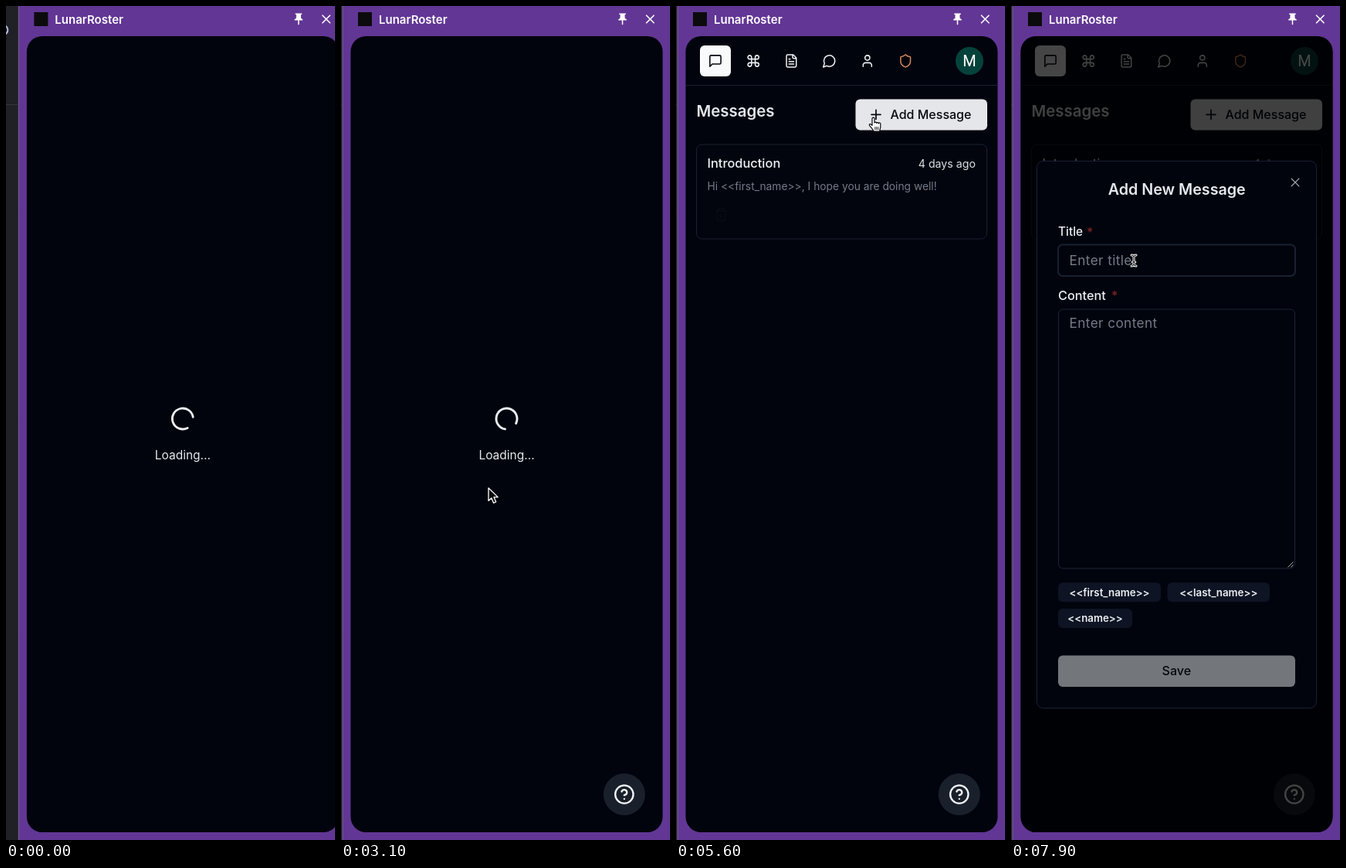
An HTML page with a canvas that plays this animation: 426x1078 px, repeating every 8000 ms.

```html
<!DOCTYPE html>
<html lang="en">
<head>
<meta charset="utf-8">
<title>Side panel</title>
<style>
html, body { margin: 0; width: 100%; height: 100%; overflow: hidden; background: #623695; }
canvas { display: block; width: 426px; height: 1078px; }
</style>
</head>
<body>
<canvas id="stage"></canvas>
<script>
const W = 426, H = 1078, LOOP = 8000;
const canvas = document.getElementById('stage');
const ctx = canvas.getContext('2d');
const dpr = window.devicePixelRatio || 1;
canvas.width = W * dpr;
canvas.height = H * dpr;

const SANS = 'Inter, "Open Sans", sans-serif';
const BG = '#01040d', WHITE = '#f8fafc', LINE = '#1a2130', MUTED = '#747b88';

const HELP_AT = 1500, PAGE_AT = 4050, DIALOG_AT = 6110;

const icons = {
  square: 'M21 15a2 2 0 0 1-2 2H7l-4 4V5a2 2 0 0 1 2-2h14a2 2 0 0 1 2 2z',
  command: 'M15 6v12a3 3 0 1 0 3-3H6a3 3 0 1 0 3 3V6a3 3 0 1 0-3 3h12a3 3 0 1 0-3-3',
  file: 'M15 2H6a2 2 0 0 0-2 2v16a2 2 0 0 0 2 2h12a2 2 0 0 0 2-2V7ZM14 2v4a2 2 0 0 0 2 2h4M10 9H8M16 13H8M16 17H8',
  bubble: 'M7.9 20A9 9 0 1 0 4 16.1L2 22Z',
  user: 'M19 21v-2a4 4 0 0 0-4-4H9a4 4 0 0 0-4 4v2M16 7a4 4 0 1 1-8 0a4 4 0 1 1 8 0',
  shield: 'M20 13c0 5-3.5 7.5-7.66 8.95a1 1 0 0 1-.67-.01C7.5 20.5 4 18 4 13V6a1 1 0 0 1 1-1c2 0 4.5-1.2 6.24-2.72a1.17 1.17 0 0 1 1.52 0C14.51 3.81 17 5 19 5a1 1 0 0 1 1 1z',
  trash: 'M3 6h18M19 6v14c0 1-1 2-2 2H7c-1 0-2-1-2-2V6M8 6V4c0-1 1-2 2-2h4c1 0 2 1 2 2v2M10 11v6M14 11v6',
  help: 'M22 12a10 10 0 1 1-20 0a10 10 0 1 1 20 0M9.09 9a3 3 0 0 1 5.83 1c0 2-3 3-3 3M12 17h.01',
  loader: 'M21 12a9 9 0 1 1-6.219-8.56',
  plus: 'M5 12h14M12 5v14',
  cross: 'M18 6L6 18M6 6l12 12',
  pin: 'M16 9V4h1c.55 0 1-.45 1-1s-.45-1-1-1H7c-.55 0-1 .45-1 1s.45 1 1 1h1v5c0 1.66-1.34 3-3 3v2h5.97v7l1 1 1-1v-7H19v-2c-1.66 0-3-1.34-3-3z'
};
for (const k in icons) icons[k] = new Path2D(icons[k]);

const arrow = new Path2D('M0 0V16.6L3.9 13L6.6 19.4L9.7 18L7 11.9H12.2Z');
const hand = new Path2D('M4 1.6a1.5 1.5 0 0 1 3 0V7a1.4 1.4 0 0 1 2.7.3a1.4 1.4 0 0 1 2.6.5a1.3 1.3 0 0 1 2.5.7V12c0 2-1 3-1 6H6C5 15.5 2.5 12.8.6 10.7C-.2 9 1.2 8 2.5 9L4 10.3z');
const handLines = new Path2D('M7.8 12.5v3.4M9.8 12.5v3.4M11.8 12.5v3.4');
const beam = new Path2D('M-3 -7Q0 -7 0 -5Q0 -7 3 -7M0 -5V5M-3 7Q0 7 0 5Q0 7 3 7M-1.8 2H1.8');

const clamp = v => Math.max(0, Math.min(1, v));
const ramp = (t, a, b) => clamp((t - a) / (b - a));
const smooth = p => p * p * (3 - 2 * p);

function box(x, y, w, h, r, fill, stroke, lw = 1) {
  ctx.beginPath();
  ctx.roundRect(x, y, w, h, r);
  if (fill) { ctx.fillStyle = fill; ctx.fill(); }
  if (stroke) { ctx.strokeStyle = stroke; ctx.lineWidth = lw; ctx.stroke(); }
}

function disc(x, y, r, fill) {
  ctx.beginPath();
  ctx.arc(x, y, r, 0, Math.PI * 2);
  ctx.fillStyle = fill;
  ctx.fill();
}

function text(s, x, y, size, weight, color, align = 'left', spacing = 0, family = SANS) {
  ctx.font = `${weight} ${size}px ${family}`;
  ctx.letterSpacing = spacing + 'px';
  ctx.textAlign = align;
  ctx.fillStyle = color;
  ctx.fillText(s, x, y);
}

// Draws a 24-unit icon centred on (x, y).
function icon(name, x, y, size, color, lw = 2, angle = 0) {
  ctx.save();
  ctx.translate(x, y);
  ctx.rotate(angle);
  ctx.scale(size / 24, size / 24);
  ctx.translate(-12, -12);
  ctx.lineCap = ctx.lineJoin = 'round';
  ctx.lineWidth = lw;
  ctx.strokeStyle = ctx.fillStyle = color;
  if (name === 'pin') ctx.fill(icons.pin); else ctx.stroke(icons[name]);
  ctx.restore();
}

function drawFrame() {
  // Edge of the browser window to the left of the panel
  ctx.fillStyle = '#623695';
  ctx.fillRect(-30, 0, W + 60, H);
  box(-60, -12, 62, H + 30, 12, '#202126', '#77678f', 1);
  ctx.fillStyle = '#35363c';
  ctx.fillRect(-30, 127, 31, 1);
  ctx.beginPath();
  ctx.arc(-18, 31, 6, 0, Math.PI * 2);
  ctx.strokeStyle = '#b4bbe0';
  ctx.lineWidth = 2;
  ctx.stroke();

  ctx.fillStyle = '#0b0b0d';
  ctx.fillRect(22, 8, 18, 18);
  text('LunarRoster', 49, 22.5, 15, 600, '#fff');
  icon('pin', 364.5, 17, 18, '#fff');
  icon('cross', 400.3, 17, 19, '#fff', 2.1);
  box(12.5, 39, 404, 1029, 20, BG);
}

function drawLoading(t) {
  icon('loader', 214.5, 533.5, 36, '#eceff4', 1.9, (62 + t * 0.36) * Math.PI / 180);
  text('Loading...', 214.5, 586, 15.5, 400, '#e6e9ee', 'center');
}

function drawHelp() {
  disc(366.8, 1019, 27, '#1a202b');
  icon('help', 366.8, 1019, 28, '#f1f4f8', 2);
}

function drawPage(t) {
  box(31, 51, 40, 40, 6, WHITE);
  icon('square', 51, 71, 19, '#05080f', 2);
  ['command', 'file', 'bubble', 'user'].forEach((name, i) =>
    icon(name, 100.2 + i * 49.2, 71, 19, '#eef1f5', 1.9));
  icon('shield', 297.2, 71, 19, '#d98a5c', 1.9);
  disc(380, 71, 18, '#05423b');
  text('M', 380, 78, 20, 400, '#fff', 'center', 0, 'Roboto, sans-serif');
  ctx.fillStyle = LINE;
  ctx.fillRect(12.5, 102, 404, 1);

  text('Messages', 26.5, 142.5, 20.4, 600, '#e3e6eb');
  const press = ramp(t, 5430, 5580);
  box(232.5, 120.5, 170.5, 40, 6, WHITE);
  box(232.5, 120.5, 170.5, 40, 6, `rgba(1,4,13,${0.08 * press})`);
  icon('plus', 259, 140.3, 20.5, '#05080f', 2);
  text('Add Message', 277.5, 145.5, 16, 500, '#05080f');

  const hover = ramp(t, 4850, 5130) * (1 - ramp(t, 5330, 5640));
  box(26.5, 179, 376, 122, 7, BG, LINE);
  box(27, 179.5, 375, 121, 7, `rgba(30,41,59,${0.32 * hover})`);
  text('Introduction', 40.5, 209.3, 16.4, 500, '#eef1f5');
  text('4 days ago', 388, 209, 14.2, 400, '#dde1e7', 'right');
  text('Hi <<first_name>>, I hope you are doing well!', 40.5, 238, 13.8, 400, MUTED);
  ctx.globalAlpha = hover;
  icon('trash', 58.8, 269.3, 19, '#3b414b', 1.8);
  ctx.globalAlpha = 1;
}

function chip(s, x, y, w) {
  box(x, y, w, 25, 6, '#0e1423');
  text(s, x + w / 2, y + 17.3, 13.3, 600, '#eceff4', 'center');
}

function drawDialog(t) {
  const p = ramp(t, DIALOG_AT, DIALOG_AT + 180);
  const ease = 1 - (1 - p) ** 2;
  box(12.5, 39, 404, 1029, 20, `rgba(0,0,0,${0.72 * ease})`);

  const s = 0.95 + 0.05 * ease;
  ctx.save();
  ctx.globalAlpha = ease;
  ctx.translate(214.5, 554);
  ctx.scale(s, s);
  ctx.translate(-214.5, -554);

  box(33.5, 200.5, 362, 707, 8, BG, '#182136');
  icon('cross', 368, 228, 19.5, '#a4a8af', 1.7);
  text('Add New Message', 214.7, 244.3, 19.7, 600, '#e6e9ee', 'center');

  text('Title', 61, 296.8, 15.4, 500, '#eceff4');
  text('*', 98, 297.5, 16, 500, '#7d2325');
  box(61, 308.5, 307, 40.5, 6, null, '#192130', 2);
  text('Enter title', 75.5, 334.5, 17.2, 400, MUTED, 'left', 0.4);

  text('Content', 61, 379.6, 16.3, 500, '#eceff4');
  text('*', 130, 380.3, 16, 500, '#7d2325');
  box(61.5, 392, 306, 335, 6, null, '#1d2534');
  text('Enter content', 75.5, 416.2, 17.2, 400, MUTED, 'left', 0.4);
  ctx.beginPath();
  ctx.moveTo(358.5, 725.5); ctx.lineTo(365.5, 718.5);
  ctx.moveTo(362.5, 725.5); ctx.lineTo(365.5, 722.5);
  ctx.strokeStyle = '#a7a9ad';
  ctx.lineWidth = 1;
  ctx.stroke();

  chip('<<first_name>>', 61, 745.3, 133);
  chip('<<last_name>>', 202.5, 745.3, 132.5);
  chip('<<name>>', 61, 779, 96);

  box(61, 839.5, 307, 40.5, 6, '#73767b');
  text('Save', 214.3, 865, 16, 500, '#05080f', 'center');

  // Caret blinks with a 500 ms half period
  if (Math.floor((t - 6100) / 500) % 2 === 0) {
    ctx.fillStyle = '#e6e9ee';
    ctx.fillRect(75.5, 316.5, 1.2, 25);
  }
  ctx.restore();
}

// Pointer hotspot: time, x, y
const track = [
  [300, 60, 150], [700, 108, 235], [1300, 112, 250], [2200, 191, 623],
  [4320, 191, 623], [5080, 90, 260], [5220, 90, 260], [5560, 254, 139],
  [6420, 254, 139], [6980, 159, 329], [LOOP, 159, 329]
];

function pointer(t) {
  const i = track.findIndex(k => k[0] > t);
  const [t0, x0, y0] = track[i - 1], [t1, x1, y1] = track[i];
  const p = smooth(ramp(t, t0, t1));
  return [x0 + (x1 - x0) * p, y0 + (y1 - y0) * p];
}

const inside = (x, y, l, top, r, b) => x >= l && x <= r && y >= top && y <= b;

function pointerKind(t, x, y) {
  if (t >= DIALOG_AT) return inside(x, y, 61, 308, 368, 349) ? 'beam' : 'arrow';
  const link = inside(x, y, 27, 179, 402, 301) || inside(x, y, 232, 120, 403, 160);
  return t >= PAGE_AT && link ? 'hand' : 'arrow';
}

function drawPointer(t) {
  if (t < track[0][0]) return;
  const [x, y] = pointer(t);
  const kind = pointerKind(t, x, y);
  ctx.save();
  ctx.translate(x, y);
  ctx.lineJoin = ctx.lineCap = 'round';
  if (kind === 'arrow') {
    ctx.fillStyle = '#08090c';
    ctx.strokeStyle = '#fff';
    ctx.lineWidth = 1.3;
    ctx.fill(arrow);
    ctx.stroke(arrow);
  } else if (kind === 'hand') {
    ctx.translate(-4, 5);
    ctx.fillStyle = '#fff';
    ctx.strokeStyle = '#08090c';
    ctx.lineWidth = 1.2;
    ctx.fill(hand);
    ctx.stroke(hand);
    ctx.lineWidth = 0.9;
    ctx.stroke(handLines);
  } else {
    ctx.strokeStyle = '#fff';
    ctx.lineWidth = 3;
    ctx.stroke(beam);
    ctx.strokeStyle = '#08090c';
    ctx.lineWidth = 1;
    ctx.stroke(beam);
  }
  ctx.restore();
}

function draw(t) {
  ctx.setTransform(dpr, 0, 0, dpr, 0, 0);
  ctx.save();
  ctx.translate(14.5 * (1 - ramp(t, 0, 220)) ** 2, 0);
  drawFrame();
  if (t < PAGE_AT) drawLoading(t); else drawPage(t);
  if (t >= HELP_AT) drawHelp();
  if (t >= DIALOG_AT) drawDialog(t);
  ctx.restore();
  drawPointer(t);
}

const start = performance.now();
function tick() {
  draw((performance.now() - start) % LOOP);
  requestAnimationFrame(tick);
}
tick();
</script>
</body>
</html>
```
